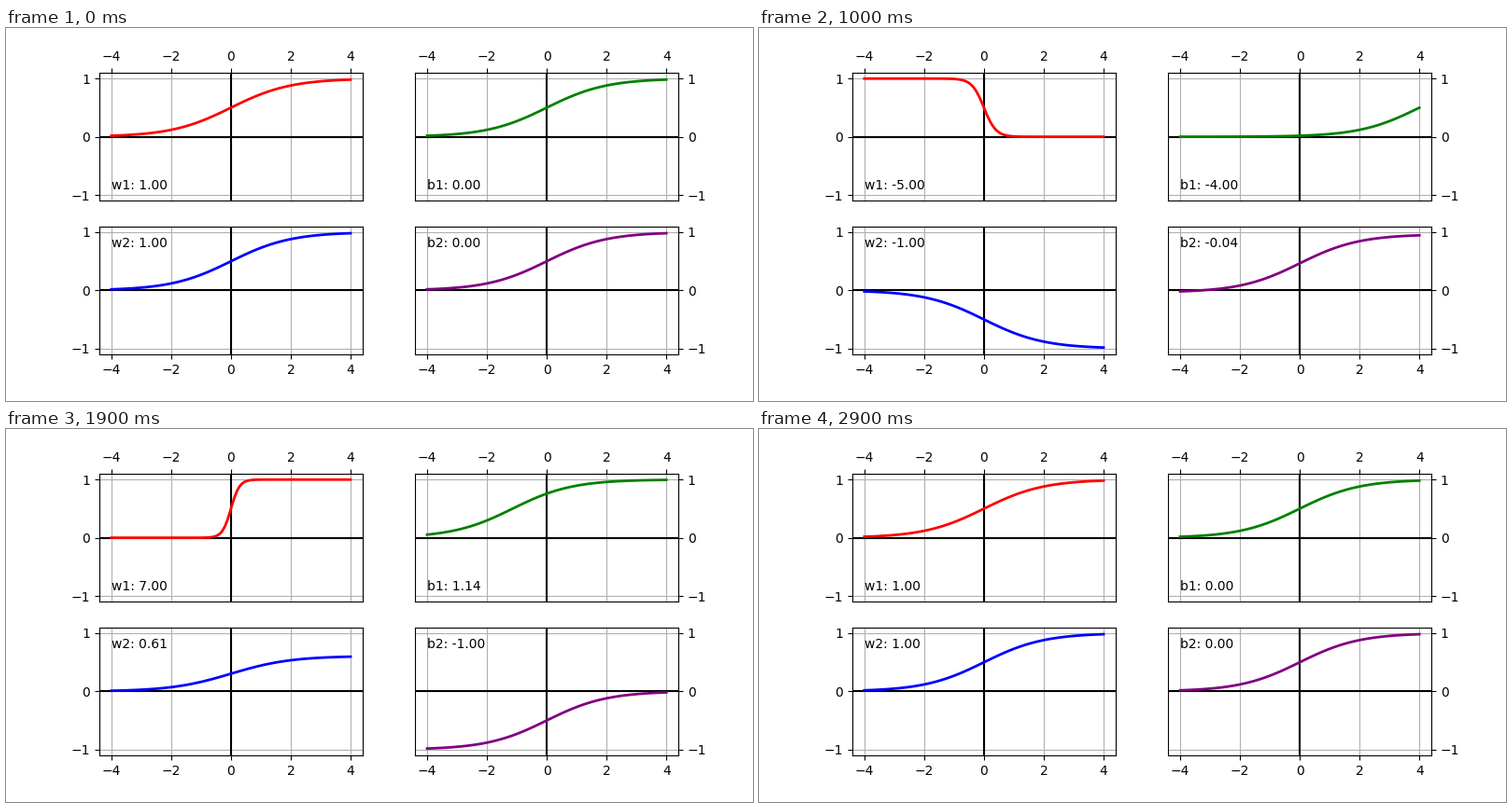
Recreate the animation shown at these times as a matplotlib script. Size 800x400 px, loop 3 s.

```python
import numpy as np
import matplotlib.pyplot as plt
from matplotlib.animation import FuncAnimation

FRAMES = 30
x = np.linspace(-4, 4, 100)


def sigmoid(z):
    return 1 / (1 + np.exp(-z))


def ramp(start, end, step, count):
    return start + (end - start) * step / (count - 1)


def swing(i, rest, first, second, turn, back):
    """Go from rest to first, on to second, then home; each leg is linear."""
    if i < turn:
        return ramp(rest, first, i, turn)
    if i < back:
        return ramp(first, second, i - turn, back - turn)
    return ramp(second, rest, i - back, FRAMES - back)


class Panel:
    def __init__(self, ax, name, color, label_y, curve, path):
        self.name, self.curve, self.path = name, curve, path
        ax.set(xlim=(-4.4, 4.4), ylim=(-1.1, 1.1),
               xticks=range(-4, 5, 2), yticks=range(-1, 2))
        ax.grid(True)
        ax.axhline(0, color="black")
        ax.axvline(0, color="black")
        self.line, = ax.plot(x, sigmoid(x), color=color, lw=2)
        self.label = ax.text(-4, label_y, "")

    def update(self, i):
        value = swing(i, *self.path)
        self.line.set_ydata(self.curve(value))
        self.label.set_text(f"{self.name}: {value:.2f}")
        return self.line, self.label


fig, axes = plt.subplots(2, 2, figsize=(8, 4), dpi=100)
fig.subplots_adjust(left=0.125, right=0.9, bottom=0.125, top=0.88,
                    wspace=0.2, hspace=0.2)

# path: rest, first and second extreme, then the steps where new legs begin
panels = [
    Panel(axes[0, 0], "w1", "red", -0.9,
          lambda w: sigmoid(w * x), (1, -5, 7, 10, 20)),
    Panel(axes[0, 1], "b1", "green", -0.9,
          lambda b: sigmoid(x + b), (0, -4, 4, 10, 25)),
    Panel(axes[1, 0], "w2", "blue", 0.75,
          lambda w: w * sigmoid(x), (1, -1, 1.5, 10, 25)),
    Panel(axes[1, 1], "b2", "purple", 0.75,
          lambda b: sigmoid(x) + b, (0, 0.5, -1, 5, 20)),
]

for ax in axes[0]:
    ax.xaxis.tick_top()
for ax in axes[:, 1]:
    ax.yaxis.tick_right()


def update(i):
    return [artist for panel in panels for artist in panel.update(i)]


anim = FuncAnimation(fig, update, frames=FRAMES, interval=100,
                     repeat=True, repeat_delay=0)
plt.show()
```
